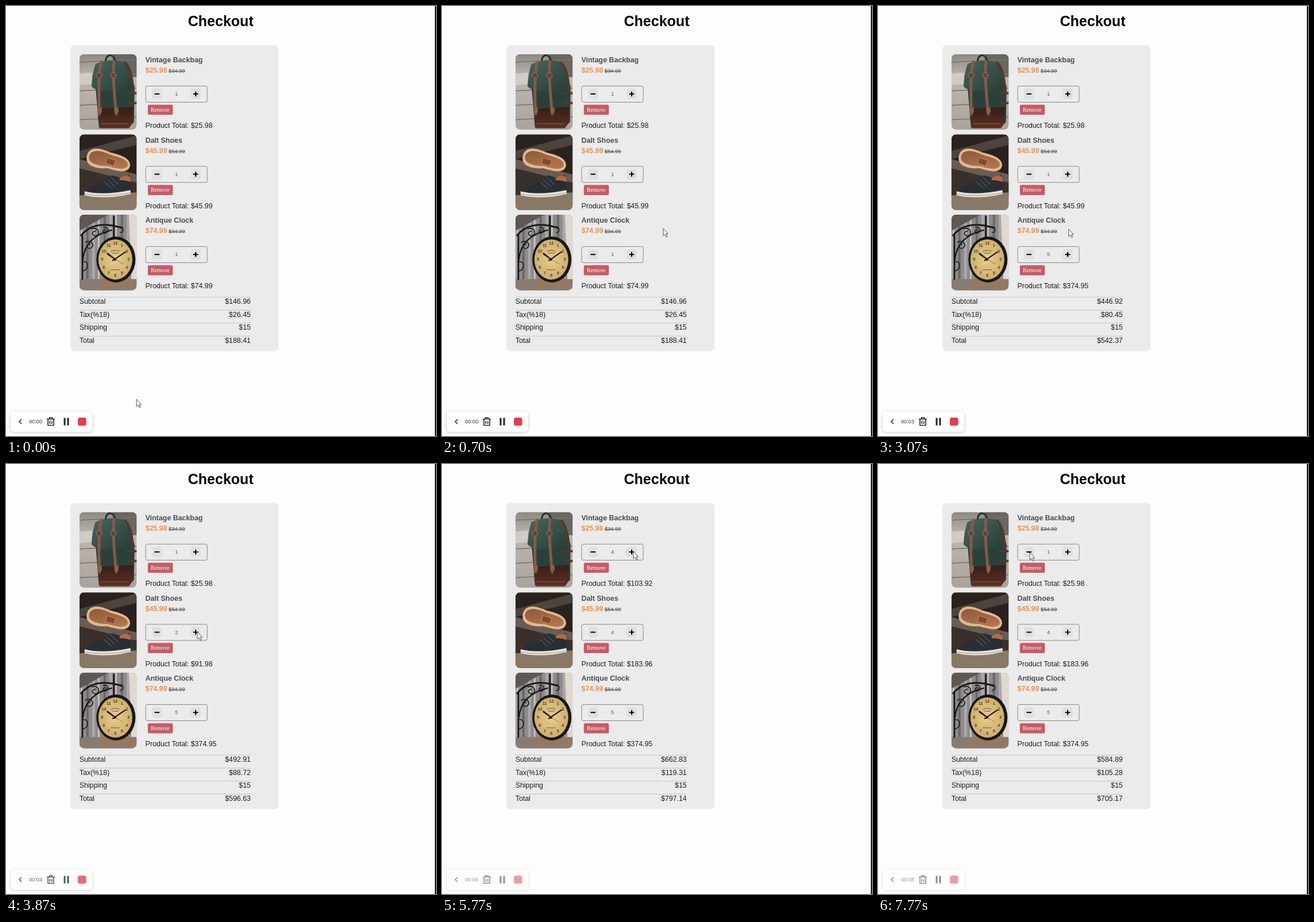
These frames come from a looping animation (748 px wide and 748 px high, 8 s). An HTML page:

```html
<!DOCTYPE html>
<html lang="en">
<head>
<meta charset="utf-8">
<title>Checkout</title>
<style>
  html, body { margin: 0; width: 100%; height: 100%; overflow: hidden; background: #fdfdfc; }
  svg { display: block; }
  #stage { width: 100vw; height: 100vh; font: 12.4px "Liberation Sans", Arial, sans-serif; fill: #1c1c1c; }
  .title { font-size: 25px; font-weight: bold; fill: #000; }
  .name { font-weight: bold; fill: #4b4b4f; }
  .price { font-weight: bold; fill: #f0904a; }
  .old { font-size: 9.3px; fill: #444; text-decoration: line-through; }
  .qty { font-size: 9.3px; fill: #555; }
  .remove { font: 9.7px "Liberation Serif", Times, serif; fill: #fff; }
  .mid { text-anchor: middle; }
  .end { text-anchor: end; }
  .line { fill: none; stroke-linecap: round; stroke-linejoin: round; }
</style>
</head>
<body>
<svg id="stage" viewBox="0 0 748 748">
  <defs>
    <clipPath id="photo"><rect width="99.5" height="131.5" rx="8"/></clipPath>
    <filter id="shadow" x="-10%" y="-30%" width="120%" height="170%">
      <feDropShadow dx="0" dy="1" stdDeviation="2.5" flood-opacity=".25"/>
    </filter>
    <linearGradient id="wall" x2="0" y2="1">
      <stop stop-color="#8d8882"/><stop offset=".3" stop-color="#bdb7b0"/><stop offset="1" stop-color="#a9a39b"/>
    </linearGradient>
    <linearGradient id="flap" x2="1" y2="1">
      <stop stop-color="#49655a"/><stop offset="1" stop-color="#263d37"/>
    </linearGradient>
    <linearGradient id="leather" x2="0" y2="1">
      <stop stop-color="#341f1b"/><stop offset="1" stop-color="#5d3022"/>
    </linearGradient>
    <linearGradient id="sole" x2="1" y2="1">
      <stop stop-color="#8c573b"/><stop offset="1" stop-color="#b87a50"/>
    </linearGradient>
    <radialGradient id="dial"><stop stop-color="#e7cd8e"/><stop offset="1" stop-color="#cfae6c"/></radialGradient>
  </defs>

  <rect width="748" height="748" fill="#fdfdfc"/>
  <rect x="746" width="2" height="748" fill="#17171c"/>
  <text class="title mid" x="373.5" y="34.5">Checkout</text>
  <rect x="112" y="68" width="362" height="532.5" rx="7" fill="#ebebeb"/>
  <g id="items"></g>
  <g id="sums"></g>

  <g id="toolbar">
    <rect x="8" y="705.5" width="142" height="35" rx="6" fill="#fff" filter="url(#shadow)"/>
    <g class="line" stroke="#1d2530" stroke-width="1.6">
      <path d="M26.5 719.5l-3.5 3.5 3.5 3.5"/>
      <path d="M71.5 718.5h13M75.5 718v-2h5v2M73 719v10.5h10V719M76.3 722.5v4M79.7 722.5v4"/>
    </g>
    <path d="M100.5 716.5h3v13h-3zM106.5 716.5h3v13h-3z" fill="#1d2530"/>
    <rect x="125" y="716" width="14.5" height="14" rx="3.5" fill="#ea384d"/>
    <text id="clock" x="40" y="726.3" font-size="9.2" fill="#333"></text>
  </g>

  <path id="cursor" d="M0 0V12.6L2.9 10 5 14.7 7 13.8 5 9.3H8.4Z" fill="#fff" stroke="#3b3d5c" stroke-width=".9" stroke-linejoin="round"/>
</svg>

<script>
const LOOP = 8000, PITCH = 139.6, SHIPPING = 15, TAX = 0.18;
const $ = id => document.getElementById(id);
const range = (n, make) => Array.from({ length: n }, (_, i) => make(i)).join('');

const backpack = `
  <rect width="100" height="132" fill="url(#wall)"/>
  <rect x="58" width="42" height="40" fill="#6a6762"/>
  ${range(5, i => `<path d="M0 ${14 + i * 25}L100 ${9 + i * 25}" stroke="#77716a" stroke-width="1.5"/>`)}
  <path d="M0 34L22 32V52L0 54Z" fill="#d0cbc4"/>
  <path d="M46 15C44-2 61-2 62 13" class="line" stroke="#26302e" stroke-width="3"/>
  <path d="M28 55L86 30 96 56 95 118 84 128H34Z" fill="#2a413a"/>
  <path d="M33 95L93 92 94 118 86 129H36Q32 112 33 95Z" fill="url(#leather)"/>
  <path d="M28 17Q55 7 80 14 91 21 92 56 84 66 48 64 30 66 21 56 23 30 28 17Z" fill="url(#flap)"/>
  <path d="M38 14Q32 34 35 104M60 13Q57 34 64 104" class="line" stroke="#84584b" stroke-width="5"/>
  <path d="M80 15Q92 28 93 62M84 68H100M86 85H100" class="line" stroke="#57352c" stroke-width="4"/>
  <g fill="#6c4137" stroke="#a57c69"><circle cx="34" cy="37" r="5"/><circle cx="59" cy="37" r="5"/></g>
  <path d="M32 93h7v9h-7zM61 93h7v9h-7z" fill="#8d5f45"/>
  <path d="M37 121H85" stroke="#80503b" stroke-width="1.5"/>`;

const shoes = `
  <rect width="100" height="132" fill="#29221f"/>
  <path d="M0 29L100 2V18L0 43Z" fill="#4c443d"/>
  <path d="M0 43L100 70V96L0 78Z" fill="#6b5c51"/>
  <path d="M0 59L100 84V110L0 108Z" fill="#39302b"/>
  <path d="M0 106L100 101V132H0Z" fill="#8a7867"/>
  <g transform="rotate(10 50 46)">
    <path d="M12 43C14 24 37 27 51 31 71 32 88 35 89 48 88 63 69 61 51 59 29 64 11 61 12 43Z" fill="#e0b990"/>
    <path d="M16 43C19 29 38 31 52 35 71 37 84 38 85 48 83 58 66 57 51 55 31 58 15 56 16 43Z" fill="url(#sole)"/>
    <path d="M47 41L63 43 61 53 46 51Z" fill="#7f4931" stroke="#c98d60"/>
  </g>
  <path d="M10 98Q24 87 42 82L56 71 70 75 87 71 90 96 86 105Q40 112 10 104Z" fill="#292e34"/>
  <path d="M70 76Q80 69 88 74L89 83Q78 79 70 80Z" fill="#b56a43"/>
  <path d="M43 82L56 94M48 78L62 91M54 74L68 87" stroke="#727679"/>
  <path d="M9 99Q40 107 89 97L89 104Q44 114 9 106Z" fill="#e7e2db"/>
  <path d="M10 104Q44 110 88 102" class="line" stroke="#8c8782" stroke-width=".8"/>`;

const clockDial = () => range(12, i => {
  const a = (i + 1) * Math.PI / 6;
  return `<text class="mid" x="${62.5 + 23 * Math.sin(a)}" y="${80.3 - 28 * Math.cos(a)}">${i + 1}</text>`;
});

const antiqueClock = `
  <rect width="100" height="132" fill="#8f8b8b"/>
  ${range(10, i => `<rect x="${i * 10 + 2}" width="${3 + i % 3}" height="132" fill="${['#c5c2c4', '#6c6868', '#aaa6a9'][i % 3]}"/>`)}
  <path d="M0 0H50L0 28Z" fill="#5f5753"/>
  <path d="M86 0H100V132H91Z" fill="#ded8cf"/>
  <path d="M0 112H100V132H0Z" fill="#887b72"/>
  <path d="M46 103L39 132M82 106L92 132M43 120H87" stroke="#a87548" stroke-width="4"/>
  <g class="line" stroke="#191919">
    <path d="M5 35V112M60 3V42M3 36Q26 8 74 23" stroke-width="3"/>
    <path d="M6 78Q10 38 56 27" stroke-width="2.5"/>
    <path d="M22 25C34 20 38 36 28 37 20 36 22 28 28 29M10 48C23 42 28 56 18 59 10 58 12 51 18 52M42 22C51 20 52 33 44 32 38 30 42 25 46 27M68 22C77 18 79 32 71 31M7 82C17 80 16 96 7 98" stroke-width="1.6"/>
  </g>
  <ellipse cx="63.5" cy="78" rx="34" ry="40" fill="#161819"/>
  <ellipse cx="62.5" cy="78" rx="29.5" ry="35" fill="url(#dial)"/>
  <g font-size="7" font-weight="bold" fill="#453c2c">${clockDial()}</g>
  <path d="M55 64Q62 60 70 64M57 67H68M54 96H70" stroke="#7d6b46" stroke-width="1.4" fill="none"/>
  <path d="M62 78L49 68" class="line" stroke="#17191b" stroke-width="3"/>
  <path d="M58 80L80 65" class="line" stroke="#17191b" stroke-width="2"/>
  <path d="M52 72L76 86" stroke="#b8573d" stroke-width=".9"/>
  <circle cx="62" cy="78" r="2.2" fill="#17191b"/>`;

// Each step: time, quantity
const products = [
  { name: 'Vintage Backbag', price: 25.98, old: 34.99, art: backpack,
    steps: [[0, 1], [5170, 2], [5470, 3], [5730, 4], [6070, 5], [6370, 4], [6600, 3], [6870, 2], [7070, 1]] },
  { name: 'Dalt Shoes', price: 45.99, old: 54.99, art: shoes,
    steps: [[0, 1], [3730, 2], [4030, 3], [4370, 4]] },
  { name: 'Antique Clock', price: 74.99, old: 94.99, art: antiqueClock,
    steps: [[0, 1], [1300, 2], [1800, 3], [2230, 4], [2800, 5]] }
];

// Time, x, y
const cursorPath = [
  [0, 227, 684], [70, 227, 684], [400, 303, 555], [700, 385, 387], [770, 370, 399],
  [830, 348, 414], [1200, 331, 432], [2830, 331, 432], [3600, 333, 292], [4400, 333, 292],
  [4870, 328, 148], [4970, 328, 148], [5130, 333, 152], [6100, 333, 152], [6340, 264, 154], [LOOP, 264, 154]
];
const fadePath = [[0, 1], [3730, 1], [4030, 0.5], [LOOP, 0.5]];

const button = (x, icon) => `
  <rect x="${x - 8.5}" y="144" width="17" height="18" rx="4" fill="#dfdfdf"/>
  <path d="${icon}" transform="translate(${x} 153)" stroke="#000" stroke-width="2"/>`;

$('items').innerHTML = products.map((p, i) => `
  <g transform="translate(0 ${i * PITCH})">
    <g transform="translate(127.7 83.7)" clip-path="url(#photo)">${p.art}</g>
    <text class="name" x="242.5" y="98">${p.name}</text>
    <text class="price" x="242.5" y="116.3">$${p.price}</text>
    <text class="old" x="283" y="116.3">$${p.old}</text>
    <rect x="243" y="139.3" width="107" height="28" rx="3" fill="none" stroke="#85858f"/>
    ${button(262.7, 'M-4.3 0H4.3')}
    ${button(330, 'M-4.3 0H4.3M0-4.3V4.3')}
    <text class="qty mid" id="qty${i}" x="296.7" y="156.3"></text>
    <rect x="246.7" y="171.7" width="43.6" height="17.6" rx="2.5" fill="#c65b66"/>
    <text class="remove mid" x="268.2" y="183.7">Remove</text>
    <text id="total${i}" x="242.5" y="212.2"></text>
  </g>`).join('');

$('sums').innerHTML = ['Subtotal', 'Tax(%18)', 'Shipping', 'Total'].map((label, i) => {
  const y = 506.5 + i * 22.6;
  return `<path d="M128 ${y}H426" stroke="${i ? '#c3c5ac' : '#c6c6cc'}"/>
    <text x="127.7" y="${y + 11.5}">${label}</text>
    <text class="end" id="sum${i}" x="425.7" y="${y + 11.5}"></text>`;
}).join('');

const money = value => '$' + value.toFixed(2);
const stepAt = (steps, t) => steps.filter(([start]) => start <= t).pop()[1];

function tween(path, t) {
  const next = Math.max(1, path.findIndex(([time]) => time > t));
  const [t0, ...from] = path[next - 1], [t1, ...to] = path[next];
  const k = (t - t0) / (t1 - t0);
  return from.map((v, i) => v + (to[i] - v) * k);
}

function setText(id, text) {
  const node = $(id);
  if (node.textContent !== text) node.textContent = text;
}

function render(t) {
  let subtotal = 0;
  products.forEach((p, i) => {
    const qty = stepAt(p.steps, t);
    subtotal += qty * p.price;
    setText('qty' + i, String(qty));
    setText('total' + i, 'Product Total: ' + money(qty * p.price));
  });
  const tax = subtotal * TAX;
  [money(subtotal), money(tax), '$' + SHIPPING, money(subtotal + tax + SHIPPING)]
    .forEach((text, i) => setText('sum' + i, text));

  setText('clock', '00:0' + Math.floor((t + 230) / 1000));
  $('toolbar').setAttribute('opacity', tween(fadePath, t)[0]);
  $('cursor').setAttribute('transform', `translate(${tween(cursorPath, t)})`);
}

const start = performance.now();
function frame() {
  render((performance.now() - start) % LOOP);
  requestAnimationFrame(frame);
}
frame();
</script>
</body>
</html>
```
